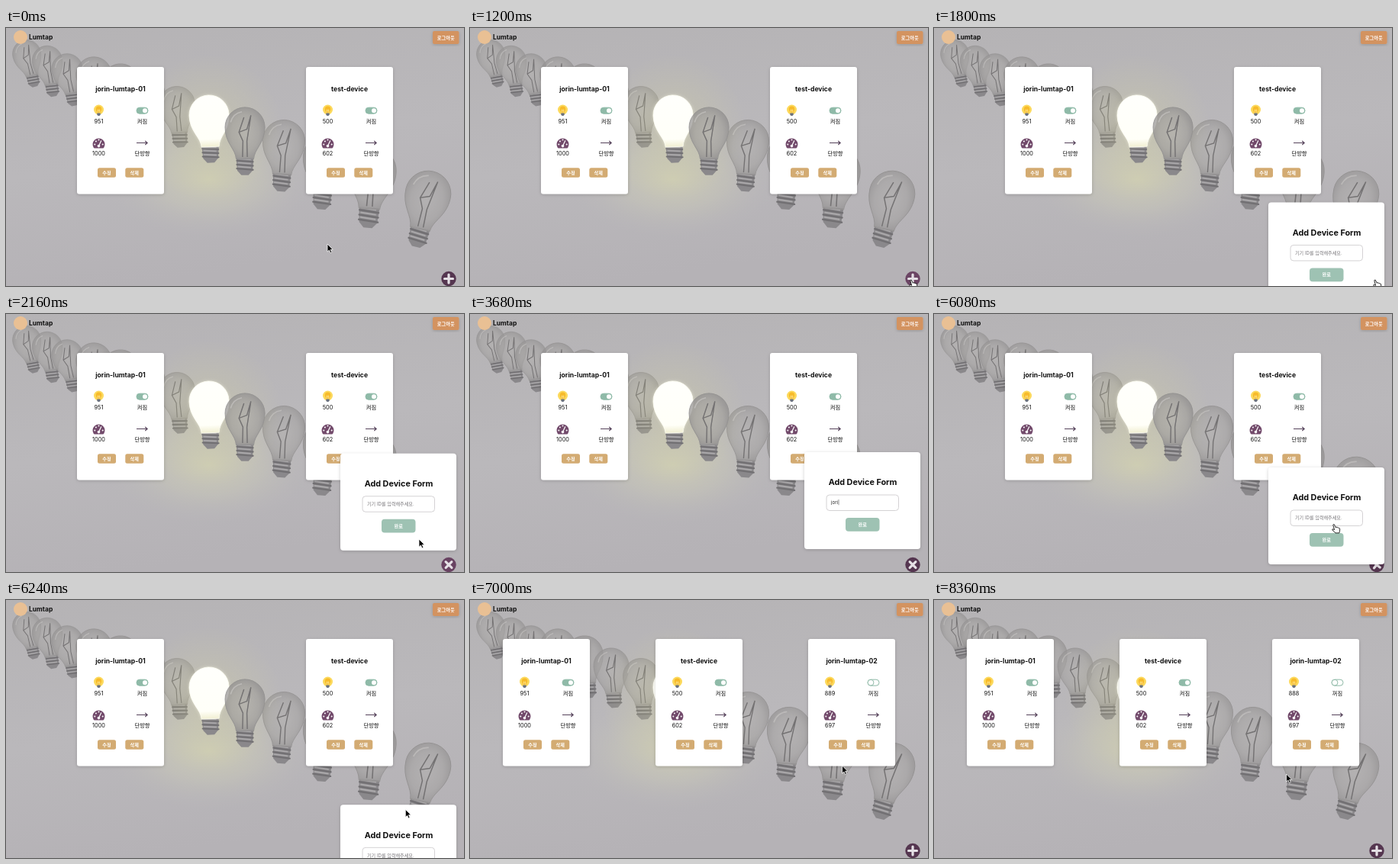
These frames come from a looping animation (600 px wide and 338 px high, 8480 ms). An HTML page:

```html
<!DOCTYPE html>
<html lang="ko">
<head>
<meta charset="utf-8">
<title>Lumtap</title>
<style>
  html, body { margin: 0; width: 100%; height: 100%; overflow: hidden; background: #b8b6b9; }
  svg { display: block; width: 100vw; height: 100vh; }
  text { font-family: Inter, "Noto Sans CJK KR", "Noto Sans CJK", sans-serif; fill: #111; }
  .mid { text-anchor: middle; }
  .bold { font-weight: 700; }
  .value { font-size: 7.3px; }
  .label { font-size: 6.2px; font-weight: 700; fill: #fff; text-anchor: middle; }
</style>
</head>
<body>
<svg id="stage" viewBox="0 0 600 338"></svg>
<script>
const LOOP = 8480;
const FORM_OPEN = 1470, FORM_CLOSE = 5986, SLIDE = 800;
const TYPE_START = 3300, CHAR_TIME = 100;
const CARD_ADDED = 6480, READING_DROPS = 7800;
const NEW_DEVICE = "jorin-lumtap-02";
const PLACEHOLDER = "기기 ID를 입력해주세요.";

// Globe centre, then screw base centre
const bulbs = [
  [27, 34, 36, 69], [54, 43, 61, 81], [80, 54, 88, 93], [115, 61, 121, 106],
  [150, 71, 155, 118], [185, 86, 189, 131], [224, 100, 228, 146], [266, 114, 268, 165],
  [313, 130, 313, 181], [364, 148, 361, 202], [418, 169, 414, 225],
  [480, 187, 475, 248], [553, 217, 540, 274]
];
const LIT = 7;

// Time, x, y and pointer shape from that time on
const pointerPath = [
  [0, 421, 283, "arrow"], [300, 421, 283, "arrow"], [1150, 578, 330, "hand"],
  [1840, 578, 330, "hand"], [1960, 570, 322, "arrow"], [2160, 541, 295, "arrow"],
  [2480, 512, 248, "beam"], [3200, 512, 248, "none"], [5000, 512, 250, "beam"],
  [5400, 524, 275.5, "hand"], [6200, 524, 275.5, "arrow"], [6700, 487.5, 217, "arrow"],
  [7120, 487.5, 217, "arrow"], [7560, 461.5, 228, "arrow"], [LOOP, 461.5, 228, "arrow"]
];

function bulb([gx, gy, bx, by], i) {
  const lit = i === LIT;
  const scale = Math.hypot(bx - gx, by - gy) / 1.96;
  const angle = Math.atan2(gx - bx, by - gy) * 180 / Math.PI;
  const glass = "M-.44 1.6C-.46 1.1-1 .8-1 0A1 1 0 0 1 1 0C1 .8 .46 1.1 .44 1.6Z";
  const threads = [1.68, 1.88, 2.08].map(y =>
    `<path d="M-.4 ${y}L.4 ${y + .06}" stroke="#727073" stroke-width=".08" stroke-linecap="round"/>
     <path d="M-.36 ${y - .1}L.3 ${y - .05}" stroke="#aaa8aa" stroke-width=".07"/>`).join("");
  const filament = `<path d="M-.12 1.5L-.1 .7L-.3 .25L.1 .1L.3-.6L.1 .7L.12 1.5M-.3 .25L-.05-.5" fill="none"
    stroke="#747273" stroke-width=".05"/>
    <path d="M-.72 -.25Q-.6 -.7-.15 -.78" fill="none" stroke="#d0cecb" stroke-width=".06" opacity=".5"/>`;
  return `<g transform="translate(${gx} ${gy}) rotate(${angle}) scale(${scale})">
    <path d="M-.43 1.55H.43L.38 2.18L.18 2.4H-.18L-.38 2.18Z" fill="#8a888b"/>${threads}
    ${lit ? `<path d="${glass}" fill="#fffff0" opacity=".5" filter="url(#halo)"/>` : ""}
    <path d="${glass}" fill="url(#${lit ? "litGlass" : "glass"})" stroke="${lit ? "#fffff4" : "#959393"}" stroke-width=".03"/>
    ${lit ? "" : filament}</g>`;
}

const pill = (x, y, w, h, r, fill, label, dy = 2.2) =>
  `<rect x="${x}" y="${y}" width="${w}" height="${h}" rx="${r}" fill="${fill}"/>
   <text class="label" x="${x + w / 2}" y="${y + h / 2 + dy}">${label}</text>`;

const lampIcon = `<g transform="translate(-28.5 107.5)">
  <circle r="6.5" cy="-.5" fill="#fcd95c"/>
  <path d="M-2 4C-2.2 2-3.8 1-3.8-1.2A3.8 3.8 0 0 1 3.8-1.2C3.8 1 2.2 2 2 4Z" fill="#f7bb2c"/>
  <path d="M-1.2 4V-.5L0 .5L1.2-.5V4" fill="none" stroke="#fff0a8" stroke-width=".7"/>
  <path d="M-2.2 4H2.2V6.3L1 7.5H-1L-2.2 6.3Z" fill="#6b7280"/></g>`;

const gaugeIcon = `<g transform="translate(-28.5 151)">
  <path d="M-6.6 6A8 8 0 1 1 6.6 6Q6.2 6.4 5.6 6.4H-5.6Q-6.2 6.4-6.6 6Z" fill="#724a6b"/>
  <g fill="#fff"><circle cx="-5.2" cy="1.5" r="1"/><circle cx="-3.6" cy="-2.6" r="1"/>
  <circle cy="-4.5" r="1"/><circle cx="5.2" cy="1.5" r="1"/><circle cy="3.6" r="1.8"/></g>
  <path d="M0 3.5L3.2-3.2" stroke="#fff" stroke-width="1.2" stroke-linecap="round"/></g>`;

const toggle = on => `<rect x="21" y="104.2" width="15" height="8" rx="4"
    fill="${on ? "#8fbaa8" : "#fff"}" stroke="#8fbaa8"/>
  <circle cx="${on ? 32 : 25}" cy="108.2" r="${on ? 3 : 3.9}" fill="#fff" stroke="#8fbaa8" stroke-width="${on ? 0 : 1}"/>`;

const card = (name, light, speed, on) => `<g class="card">
  <rect x="-57" y="51" width="114" height="166.5" rx="3" fill="#fff" filter="url(#shadow)"/>
  <text class="mid bold" y="82.5" font-size="8.6">${name}</text>
  ${lampIcon}${toggle(on)}${gaugeIcon}
  <path d="M21 150.5H35M32.2 148L35.2 150.5L32.2 153" fill="none" stroke="#55425a" stroke-width="1.1"/>
  <text class="mid value reading" x="-28.5" y="124.7">${light}</text>
  <text class="mid value" x="28.5" y="124.7">${on ? "켜짐" : "꺼짐"}</text>
  <text class="mid value" x="-28.5" y="166.7">${speed}</text>
  <text class="mid value" x="28.5" y="166.7">단방향</text>
  ${pill(-30, 183.3, 24, 12.4, 2.5, "#d3ab72", "수정")}${pill(6.3, 183.3, 24, 12.4, 2.5, "#d3ab72", "삭제")}
</g>`;

const pointers = `<g id="pointer">
  <path data-kind="arrow" d="M0 0V10.2L2.4 8L4 11.7L5.8 10.9L4.2 7.3H7.3Z" fill="#000" stroke="#fff" stroke-width=".8"/>
  <path data-kind="hand" d="M-1.2 1Q-.9-.4.3.2L2.2 4.2L3 3.6Q4.2 3.4 4.4 4.4Q5.8 3.8 6.2 5Q7.6 4.8 7.7 6.2L7.5 9.2L6.8 11.4H1.9L-2.1 7.4Q-2.7 6.1-1.1 6.3L.6 7.3Z"
    fill="#fff" stroke="#111" stroke-width=".9" stroke-linejoin="round"/>
  <path data-kind="beam" d="M-1.5-4Q0-4 0-3Q0-4 1.5-4M0-3V4M-1.5 5Q0 5 0 4Q0 5 1.5 5" fill="none" stroke="#222" stroke-width=".8"/>
</g>`;

const stage = document.getElementById("stage");
stage.innerHTML = `<defs>
  <linearGradient id="wall" x2=".25" y2="1">
    <stop stop-color="#b5b3b5"/><stop offset=".55" stop-color="#bab8bb"/><stop offset="1" stop-color="#b5b2b6"/></linearGradient>
  <radialGradient id="floorGlow">
    <stop stop-color="#d2d1b4" stop-opacity=".8"/><stop offset=".5" stop-color="#c8c7b8" stop-opacity=".5"/>
    <stop offset="1" stop-color="#bab8bb" stop-opacity="0"/></radialGradient>
  <radialGradient id="spill">
    <stop stop-color="#d8d69c" stop-opacity=".35"/><stop offset="1" stop-color="#d8d69c" stop-opacity="0"/></radialGradient>
  <radialGradient id="glass">
    <stop stop-color="#b0aeac" stop-opacity=".5"/><stop offset=".7" stop-color="#a4a2a1" stop-opacity=".6"/>
    <stop offset="1" stop-color="#989696" stop-opacity=".75"/></radialGradient>
  <linearGradient id="litGlass" x2="0" y2="1">
    <stop stop-color="#fffffc"/><stop offset=".85" stop-color="#fffff8"/><stop offset="1" stop-color="#f1efd2"/></linearGradient>
  <filter id="halo" x="-50%" y="-50%" width="200%" height="200%"><feGaussianBlur stdDeviation=".08"/></filter>
  <filter id="shadow" x="-15%" y="-15%" width="130%" height="130%">
    <feDropShadow dx="0" dy="1" stdDeviation="2" flood-opacity=".18"/></filter>
</defs>
<rect width="600" height="338" fill="url(#wall)"/>
<ellipse cx="266" cy="198" rx="140" ry="78" fill="url(#floorGlow)"/>
${bulbs.map((b, i) => i === LIT ? "" : bulb(b, i)).join("")}
<circle cx="266" cy="130" r="95" fill="url(#spill)"/>
${bulb(bulbs[LIT], LIT)}${bulb(bulbs[LIT + 1], LIT + 1)}
<circle cx="19" cy="12" r="9" fill="#e9c094"/>
<text class="bold" x="30" y="15.2" font-size="8.5">Lumtap</text>
<g filter="url(#shadow)">${pill(559, 4, 34.5, 17, 2, "#d39361", "로그아웃")}</g>
${card("jorin-lumtap-01", 951, 1000, true)}
${card("test-device", 500, 602, true)}
${card(NEW_DEVICE, 889, 697, false)}
<g transform="translate(580 328.5)"><circle id="addDisc" r="9.7"/>
  <path id="addSign" d="M-5.5 0H5.5M0-5.5V5.5" stroke="#e5e0e5" stroke-width="3.2" stroke-linecap="round"/></g>
<g id="form">
  <rect x="438" width="152" height="127" rx="4" fill="#fff" filter="url(#shadow)"/>
  <text class="mid bold" x="514.5" y="43.4" font-size="10.8">Add Device Form</text>
  <rect x="467" y="56" width="94.5" height="20.5" rx="4" fill="#fff" stroke="#c9c7ca" stroke-width=".8"/>
  <text id="entry" x="473" y="68.3" font-size="6.1"></text>
  ${pill(492, 86, 44.5, 17.7, 4, "#9ec2b3", "완료")}
</g>${pointers}`;

const find = id => document.getElementById(id);
const cards = [...document.querySelectorAll(".card")];
const reading = cards[2].querySelector(".reading");
const clamp = v => Math.min(1, Math.max(0, v));
const mix = (a, b, k) => a + (b - a) * k;
const smooth = k => k * k * (3 - 2 * k);

// CSS "ease": cubic-bezier(.25, .1, .25, 1)
function ease(x) {
  x = clamp(x);
  let low = 0, high = 1, u = .5;
  for (let i = 0; i < 20; i++) {
    u = (low + high) / 2;
    const px = .75 * u * (1 - u) + u ** 3;
    if (px < x) low = u; else high = u;
  }
  return .3 * u * (1 - u) ** 2 + 3 * u * u * (1 - u) + u ** 3;
}

function drawPointer(t) {
  const i = pointerPath.findIndex((p, n) => n && t < p[0]);
  const [t0, x0, y0, kind] = pointerPath[i - 1];
  const [t1, x1, y1] = pointerPath[i];
  const k = smooth((t - t0) / (t1 - t0));
  find("pointer").setAttribute("transform", `translate(${mix(x0, x1, k)} ${mix(y0, y1, k)})`);
  for (const shape of find("pointer").children) {
    shape.style.display = shape.dataset.kind === kind ? "" : "none";
  }
}

function drawForm(t) {
  const open = ease((t - FORM_OPEN) / SLIDE) - ease((t - FORM_CLOSE) / SLIDE);
  find("form").setAttribute("transform", `translate(0 ${mix(340, 181, open)})`);
  find("addSign").setAttribute("transform", `rotate(${45 * open})`);

  const hover = clamp((t - 1100) / 150) - clamp((t - 2000) / 400);
  find("addDisc").setAttribute("fill",
    `rgb(${mix(85, 118, hover)},${mix(54, 76, hover)},${mix(80, 110, hover)})`);

  const count = t < FORM_CLOSE ? Math.floor((t - TYPE_START) / CHAR_TIME) + 1 : 0;
  const typed = NEW_DEVICE.slice(0, Math.max(0, count));
  const entry = find("entry");
  entry.textContent = typed ? typed + (t < 5900 ? "|" : "") : PLACEHOLDER;
  entry.style.fill = typed ? "#222" : "#777579";
}

function draw(t) {
  const added = t >= CARD_ADDED;
  const centres = added ? [100, 300, 500] : [150, 450];
  cards.forEach((el, i) => {
    el.style.display = i < centres.length ? "" : "none";
    el.setAttribute("transform", `translate(${centres[i] || 0} 0)`);
  });
  reading.textContent = t < READING_DROPS ? 889 : 888;
  drawForm(t);
  drawPointer(t);
}

const start = performance.now();
function tick() {
  draw((performance.now() - start) % LOOP);
  requestAnimationFrame(tick);
}
tick();
</script>
</body>
</html>
```
